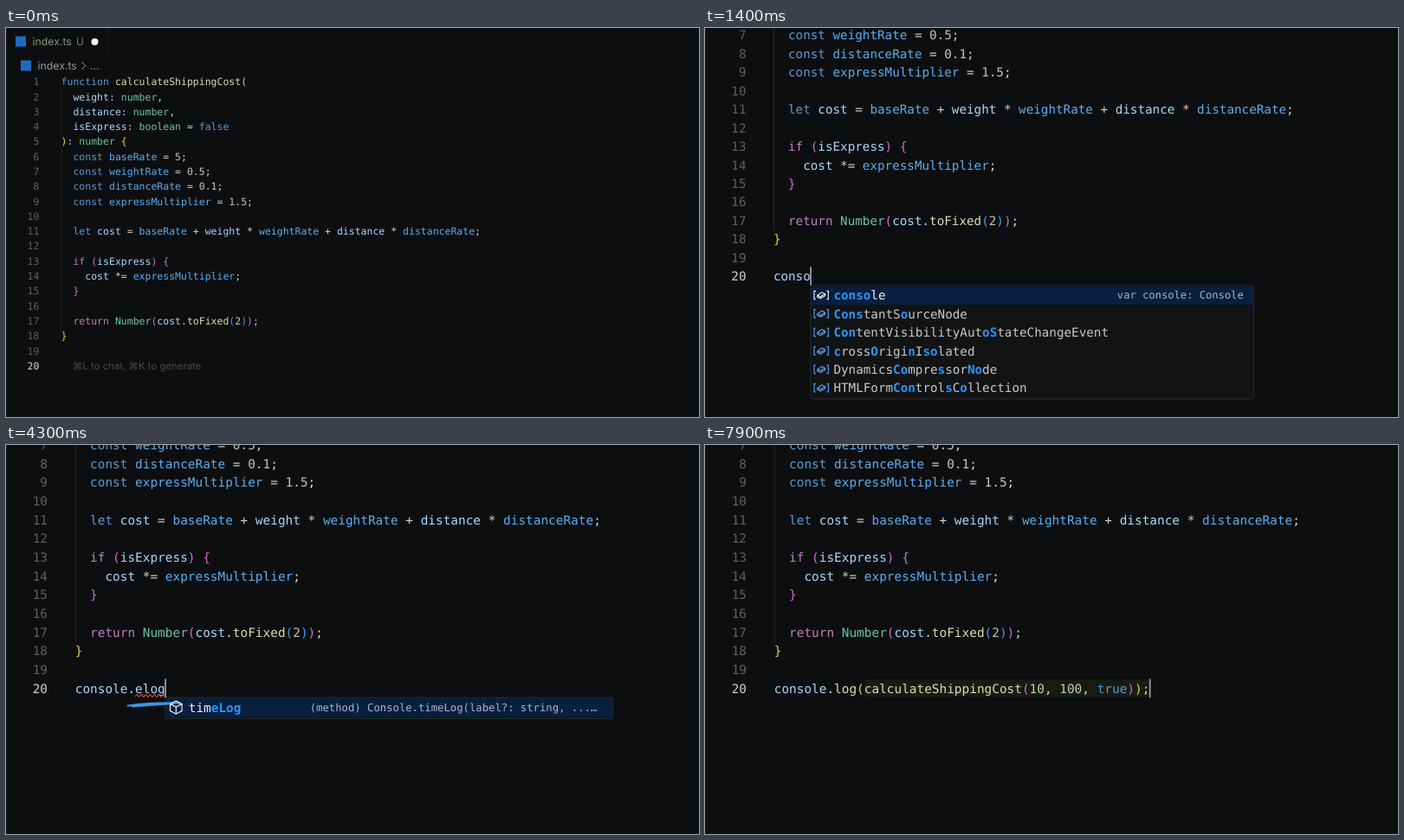
Animation of 800 by 450 pixels, one loop 8000 ms. Source, as an HTML page with a canvas:

```html
<!DOCTYPE html>
<html lang="en">
<head>
<meta charset="utf-8">
<title>Code editor</title>
<style>
  html, body { margin: 0; width: 100%; height: 100%; overflow: hidden; background: #0d0e0f; }
  canvas { display: block; }
</style>
</head>
<body>
<canvas width="800" height="450"></canvas>
<script>
const ctx = document.querySelector('canvas').getContext('2d');
const LOOP = 8000, ZOOM = 0.2533;
const CW = 6.92, LH = 17.29, X0 = 63.6, Y0 = 62.1;   // character grid
const MONO = '"DejaVu Sans Mono", monospace', SANS = 'Inter, "DejaVu Sans", sans-serif';
const SIZE = 11.5, POP_W = 412.5;

const CODE = `function calculateShippingCost(
  weight: number,
  distance: number,
  isExpress: boolean = false
): number {
  const baseRate = 5;
  const weightRate = 0.5;
  const distanceRate = 0.1;
  const expressMultiplier = 1.5;

  let cost = baseRate + weight * weightRate + distance * distanceRate;

  if (isExpress) {
    cost *= expressMultiplier;
  }

  return Number(cost.toFixed(2));
}
`.split('\n');
const CALL = 'console.log(calculateShippingCost(10, 100, true));';

const GROUPS = [
  ['#569cd6', 'function const let true false'],
  ['#bf80bc', 'if return'],
  ['#6cc3ab', 'number boolean Number'],
  ['#dcdcae', 'calculateShippingCost toFixed log'],
  ['#5aaef5', 'baseRate weightRate distanceRate expressMultiplier'],
];
const WORDS = new Map(GROUPS.flatMap(([c, list]) => list.split(' ').map(w => [w, c])));
const BRACKETS = ['#eccb58', '#cf6ed0', '#3e9bf8'];

// [time, text on the last line]
const TYPING = [[-500, ''], [600, 'c'], [740, 'co'], [880, 'con'], [1040, 'cons'], [1320, 'conso'],
  [1900, 'consol'], [3700, 'console'], [3770, 'console.'], [3840, 'console.e'],
  [3910, 'console.el'], [3980, 'console.elo'], [4050, 'console.elog'], [6800, CALL]];
const GHOST_AT = 2600, SWASH_AT = 4120, EDIT_AT = 5600;

// Completion lists; matched letters stand in square brackets
const FIRST = { rows: 12, items: ['[cons]ole', '[cons]t', '[Cons]tantSourceNode', '[C]ompressi[onS]tream',
  '[Con]tentVisibilityAuto[S]tateChangeEvent', '[Co]u[n]tQueuing[S]trategy'] };
const LISTS = {
  co: FIRST, con: FIRST, cons: FIRST,
  conso: { detail: 'var console: Console', dx: 285.5, items: ['[conso]le', '[Cons]tantS[o]urceNode',
    '[Con]tentVisibilityAut[oS]tateChangeEvent', '[c]ross[O]rigi[n]I[so]lated',
    'Dynamics[Co]mpre[s]sor[No]de', 'HTMLForm[Con]trol[s]C[o]llection'] },
  consol: { detail: 'var console: Console', dx: 285, items: ['[consol]e', '[c]ross[O]rigi[n]I[sol]ated',
    '[Con]tentVi[s]ibi[l]ityAut[o]StateChangeEvent', 'HTMLForm[Con]trol[s]C[ol]lection'] },
  'console.elog': { detail: '(method) Console.timeLog(label?: string, ...…', dx: 133.2, method: true,
    items: ['tim[eLog]'] },
};

const ICONS = {
  variable: new Path2D('M-5-3.8H-6.6V3.8H-5M5-3.8H6.6V3.8H5M-3.6.2L.6-2.6L3.6-1.2V.5L-.6 3L-3.6 1.6ZM-3.6.2L-.6 1.4L3.6-1.2'),
  keyword: new Path2D('M-6.5-4.5H1V-2H-6.5ZM3-3.5H6.5M-6.5 .5H-1M1 .5H4M-6.5 4H-3M-1 4H6.5'),
  method: new Path2D('M0-6L5.4-3.2V3.2L0 6L-5.4 3.2V-3.2ZM-5.4-3.2L0-.4L5.4-3.2M0-.4V6'),
};

const lineY = n => Y0 + (n - 1) * LH;
const colX = n => X0 + n * CW;

function rect(x, y, w, h, color) {
  ctx.fillStyle = color;
  ctx.fillRect(x, y, w, h);
}

// Monospaced text, one cell per character, centred on y
function mono(text, x, y, color, size = SIZE, style = '') {
  ctx.font = `${style} ${size}px ${MONO}`;
  ctx.fillStyle = color;
  const step = CW * size / SIZE;
  [...text].forEach((ch, i) => ch !== ' ' && ctx.fillText(ch, x + i * step, y + size * 0.365));
}

function sans(text, x, y, color, size) {
  ctx.font = `${size}px ${SANS}`;
  ctx.fillStyle = color;
  ctx.fillText(text, x, y + size * 0.36);
}

// Draws highlighted code and returns the bracket depth at its end
function code(text, x, y, depth = 0) {
  for (const { 0: tok, index } of text.matchAll(/[A-Za-z]+|[\d.]*\d|[(){}]|[^\s\w]/g)) {
    let color = '#d4d4d4';
    if (/[A-Za-z]/.test(tok)) color = WORDS.get(tok) || '#a5dafc';
    else if (/\d/.test(tok)) color = '#bccfaa';
    else if ('({'.includes(tok)) color = BRACKETS[depth++ % 3];
    else if (')}'.includes(tok)) color = BRACKETS[--depth % 3];
    mono(tok, x + index * CW, y, color);
  }
  return depth;
}

function squiggle(from, to) {
  const y = lineY(20) + 7;
  ctx.beginPath();
  for (let x = colX(from); x <= colX(to); x += 0.5) ctx.lineTo(x, y + Math.sin(x * 1.55) * 1.1);
  ctx.strokeStyle = '#e0453e';
  ctx.lineWidth = 0.9;
  ctx.stroke();
}

function icon(name, x, y, color) {
  ctx.save();
  ctx.translate(x, y);
  ctx.strokeStyle = color;
  ctx.lineWidth = 0.95;
  ctx.stroke(ICONS[name]);
  ctx.restore();
}

function header() {
  rect(117, 0, 1, 31, '#1a1b1c');
  rect(11, 9.5, 12, 12, '#1f6bc0');
  sans('index.ts', 30.5, 16, '#7d9f78', 12.3);
  sans('U', 81, 16, '#66825f', 12);
  ctx.beginPath();
  ctx.arc(102.5, 16, 4, 0, 7);
  ctx.fillStyle = '#f4f4f4';
  ctx.fill();
  rect(17, 37.5, 12, 12, '#1f6bc0');
  sans('index.ts', 36.5, 43.5, '#9a9b9c', 12.3);
  sans('...', 97, 43.5, '#9a9b9c', 12.3);
  ctx.beginPath();
  ctx.moveTo(87.5, 39.5);
  ctx.lineTo(91.7, 43.7);
  ctx.lineTo(87.5, 47.9);
  ctx.strokeStyle = '#9a9b9c';
  ctx.lineWidth = 1;
  ctx.stroke();
}

function codeBlock() {
  for (const [a, b] of [[2, 4], [6, 17]])
    rect(X0, lineY(a) - LH / 2, 0.8, (b - a + 1) * LH, '#292b2d');
  let depth = 0;
  CODE.forEach((text, i) => {
    const num = String(i + 1);
    mono(num, 38.3 - num.length * CW, lineY(i + 1), '#5d6165');
    depth = code(text, X0, lineY(i + 1), depth);
  });
  mono('20', 38.3 - 2 * CW, lineY(20), '#d0d0d0');
}

// Hand-drawn underline, grown along a zigzag
function swash(p) {
  if (p <= 0) return;
  ctx.save();
  ctx.setTransform(1, 0, 0, 1, 0, 0);
  ctx.beginPath();
  ctx.moveTo(140.5, 301.5);
  ctx.quadraticCurveTo(168, 298, 200, 298.5);
  ctx.lineTo(146, 302.5);
  ctx.quadraticCurveTo(175, 300, 203, 301);
  ctx.lineTo(153, 304);
  ctx.quadraticCurveTo(178, 302.5, 203, 304);
  ctx.setLineDash([274 * Math.min(p, 1), 999]);
  ctx.strokeStyle = '#3b94e2';
  ctx.lineWidth = 2.2;
  ctx.lineCap = ctx.lineJoin = 'round';
  ctx.stroke();
  ctx.restore();
}

function popupItem(item, x, y, typed, method, selected) {
  const kind = method ? 'method' : item === '[cons]t' ? 'keyword' : 'variable';
  icon(kind, x + 10, y, selected ? '#f0f2f5' : kind === 'keyword' ? '#b9bbbd' : '#559ee8');
  let col = 0, hits = 0, on = false;
  for (const ch of item) {
    if (ch === '[' || ch === ']') { on = ch === '['; continue; }
    const hit = on && hits++ < typed;
    mono(ch, x + 21.5 + col++ * CW, y, hit ? '#2b94fa' : selected ? '#f2f2f2' : '#c8c9ca', SIZE, hit ? 'bold' : '');
  }
}

function popup(text, swashPart) {
  const list = LISTS[text];
  if (!list) return;
  const x = colX(text.length), y = lineY(20) + LH / 2, top = y + 0.8;
  const h = (list.rows || list.items.length) * LH + 2.2;
  ctx.beginPath();
  ctx.roundRect(x, y, POP_W, h, 2);
  ctx.fillStyle = '#121314';
  ctx.fill();
  ctx.strokeStyle = '#2a2c2e';
  ctx.lineWidth = 0.8;
  ctx.stroke();
  rect(x + 0.4, top, POP_W - 0.8, LH, '#081f3f');
  if (list.rows) {
    rect(x + POP_W - 10.4, top, 10, h, '#2b2d2f');
    rect(x + POP_W - 10.4, top, 10, LH, '#17345a');
  }
  swash(swashPart);
  list.items.forEach((item, i) =>
    popupItem(item, x, top + (i + 0.5) * LH - 0.3, text.length, list.method, i === 0));
  if (list.detail) mono(list.detail, x + list.dx, top + LH / 2 - 0.3, '#aab6c6', 9.77);
}

function lastLine(t) {
  const [since, text] = TYPING.findLast(([at]) => at <= t);
  const y = lineY(20), top = y - 8, n = text.length;
  const typo = text === 'console.elog', ghost = text === 'consol' && t >= GHOST_AT;
  const edit = typo && t >= EDIT_AT;

  if (!text) sans('⌘L to chat, ⌘K to generate', 77, y, '#48494b', 11.4);
  if (edit) {
    rect(colX(8), top, 4 * CW, 16, '#3a1518');
    rect(X0 + 138.5, top, 42 * CW + 45.5 - 45.5 - 1, 16, '#0d0e0f');
    rect(X0 + 125 + 8 * CW, top, 41.7 * CW, 16, '#23260f');
    code(CALL, X0 + 125, y);
  }
  if (text === CALL) rect(colX(12), top, 38 * CW, 16, `rgba(110,120,40,${0.12 + 0.14 * Math.exp((since - t) / 250)})`);
  code(text, X0, y);
  if (ghost) mono('e.log(calculateShippingCost(10, 100, true));', colX(6), y, '#55585b', SIZE, 'italic');
  if (ghost) squiggle(0, 6);
  if (typo) squiggle(8, 12);
  popup(text, (t - SWASH_AT) / 430);
  if ((t - since) % 1000 < 500) rect(colX(n) - 0.4, y - LH / 2, 1.3, LH, '#a4a6a8');
}

function zoomAt(t) {
  const x = Math.min(1, Math.max(0, (t - 345) / 1380));
  return 1 + ZOOM * (x < 0.5 ? 4 * x ** 3 : 1 - 4 * (1 - x) ** 3);
}

function draw(now) {
  const t = now % LOOP, s = zoomAt(t);
  ctx.setTransform(1, 0, 0, 1, 0, 0);
  ctx.textRendering = 'geometricPrecision';
  rect(0, 0, 800, 450, '#0d0e0f');
  rect(0, 0, 1, 450, '#1b1c1d');
  ctx.setTransform(s, 0, 0, s, 0, -822 * (s - 1));
  header();
  codeBlock();
  lastLine(t);
  requestAnimationFrame(draw);
}
requestAnimationFrame(draw);
</script>
</body>
</html>
```
